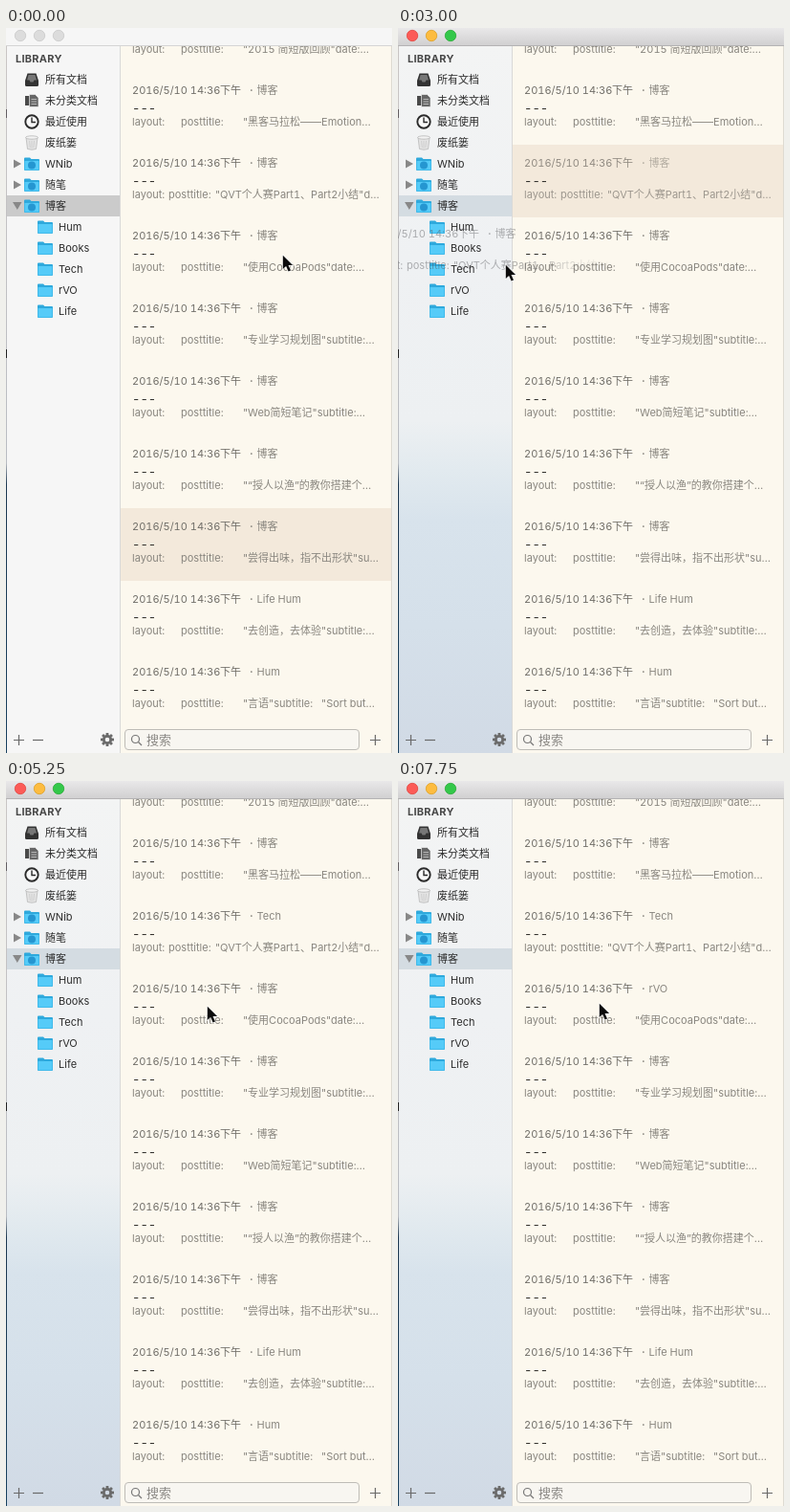
These frames come from a looping animation (404x758 px, 8000 ms). An HTML page:

```html
<!DOCTYPE html>
<html lang="zh-CN">
<head>
<meta charset="utf-8">
<title>Library</title>
<style>
  html, body { margin: 0; width: 100%; height: 100%; overflow: hidden; background: #fcf8ee; }
  svg { display: block; width: 404px; height: 758px; }
  text {
    font: 11px Inter, "Noto Sans CJK SC", "Noto Sans CJK", sans-serif;
    font-variant-numeric: tabular-nums; white-space: pre;
  }
</style>
</head>
<body>
<svg id="stage" viewBox="0 0 404 758" xmlns="http://www.w3.org/2000/svg"></svg>
<script>
const LOOP = 8000, STEP = 250, ROW = 76;
const stage = document.getElementById('stage');

const titles = [
  '"2015 简短版回顾"date:…',
  '"黑客马拉松——Emotion…',
  '"QVT个人赛Part1、Part2小结"d…',
  '"使用CocoaPods"date:…',
  '"专业学习规划图"subtitle:…',
  '"Web简短笔记"subtitle:…',
  '"“授人以渔”的教你搭建个…',
  '"尝得出味，指不出形状"su…',
  '"去创造，去体验"subtitle:…',
  '"言语"subtitle:   "Sort but…'
];
const tags = { 8: 'Life Hum', 9: 'Hum' };
const folders = ['Hum', 'Books', 'Tech', 'rVO', 'Life'];

// Cursor path: time, x, y
const path = [
  [0, 289, 237], [500, 289, 237], [750, 280, 222], [1000, 264, 190], [1250, 253, 171],
  [1500, 253, 171], [1750, 268, 172], [2000, 273, 173], [2250, 273, 173], [2500, 232, 190],
  [2750, 165, 225], [3000, 112, 247], [3250, 92, 252], [3500, 85, 253], [4500, 84, 253],
  [4750, 118, 247], [5250, 210, 235], [5750, 250, 234], [6000, 248, 233], [6250, 225, 240],
  [6750, 105, 272], [7000, 82, 275], [7250, 82, 275], [7500, 140, 255], [7750, 210, 232]
];
const drags = [
  { row: 2, folder: 2, press: 2000, start: 2500, hover: 3250, drop: 3750, x: 273, y: 173 },
  { row: 3, folder: 3, press: 5750, start: 6250, hover: 7000, drop: 7250, x: 250, y: 234 }
];

const rect = (x, y, w, h, fill, more = '') =>
  `<rect x="${x}" y="${y}" width="${w}" height="${h}" fill="${fill}" ${more}/>`;
const text = (x, y, s, fill = '#2c2c2c', more = '') =>
  `<text x="${x}" y="${y}" fill="${fill}" ${more}>${s}</text>`;
const circle = (x, y, r, fill, more = '') =>
  `<circle cx="${x}" cy="${y}" r="${r}" fill="${fill}" ${more}/>`;
const line = (d, color, w = 1) => `<path d="${d}" fill="none" stroke="${color}" stroke-width="${w}"/>`;
const shape = (d, fill) => `<path d="${d}" fill="${fill}"/>`;
const stops = list => list.map(([o, c, a = 1]) =>
  `<stop offset="${o}" stop-color="${c}" stop-opacity="${a}"/>`).join('');
const rowTop = i => 46 + ROW * (i - 1);

function note(i, ink) {
  const y = rowTop(i), tight = i === 2;
  const gray = ink || '#89867f';
  return text(132, y + 23, '2016/5/10 14:36', ink || '#716f69', 'class="date"')
    + text(224, y + 23, '下午', ink || '#716f69', 'class="date"')
    + text(255, y + 23, '·', gray, 'class="tag" style="font-weight:700"')
    + text(262.5, y + 23, tags[i] || '博客', gray, 'class="tag name"')
    + text(132, y + 43, '---', ink || '#35332f', 'style="font-size:13px"')
    + text(132, y + 56, 'layout:', gray, 'class="body"')
    + text(tight ? 170 : 183, y + 56, 'posttitle:', gray, 'class="body"')
    + text(tight ? 219 : 248, y + 56, titles[i], gray, 'class="body"');
}

const folder = (x, y) => `<g transform="translate(${x} ${y})">`
  + shape('M0-5.5Q0-6.5 1-6.5H6L7.5-5H15Q16-5 16-4V6Q16 7 15 7H1Q0 7 0 6Z', '#2fa9dc')
  + shape('M.5-3H15.5V6Q15.5 6.5 15 6.5H1Q.5 6.5.5 6Z', '#55cbf8') + '</g>';

function sidebar() {
  let s = text(10, 36, 'LIBRARY', '#484848', 'style="font-weight:700;letter-spacing:.25px"');
  const top = ['所有文档', '未分类文档', '最近使用', '废纸篓', 'WNib', '随笔', '博客'];
  top.forEach((name, i) => {
    const y = 54 + 22 * i;
    s += text(41, y + 4, name);
    if (i > 3) {
      s += folder(19, y) + circle(27, y + 1.5, 4, '#2596d1');
      s += shape(i < 6 ? `M8 ${y - 4.5}V${y + 4.5}L16 ${y}Z` : `M7 ${y - 4}H16.5L11.8 ${y + 4}Z`, '#888');
    }
  });
  // Tray, pages, clock, bin
  s += shape('M22.5 47.5H31.5L34 55V59.5Q34 61 32.5 61H21.5Q20 61 20 59.5V55Z', '#333')
    + shape('M23.5 49H30.5L32 54.5H29.5L28.5 56.5H25.5L24.5 54.5H22Z', '#777')
    + shape('M20 71H27V81H20Z', '#4a4a4a')
    + '<path d="M24.5 69.5H30.5L34 73V82.5H24.5Z" fill="#666" stroke="#eee" stroke-width=".7"/>'
    + line('M26.5 74.5H32M26.5 77H32M26.5 79.5H32', '#ccc', .8)
    + circle(27, 98, 6.7, '#f8f8f8', 'stroke="#2b2b2b" stroke-width="1.9"')
    + line('M27 93.5V98.5H31', '#2b2b2b', 1.4)
    + '<path d="M21 114.5L22.5 126.5Q27 128 31.5 126.5L33 114.5Z" fill="#e3e3e3" stroke="#b9b9b9" stroke-width=".8"/>'
    + '<ellipse cx="27" cy="114.5" rx="6.5" ry="1.7" fill="#f3f3f3" stroke="#b5b5b5" stroke-width=".8"/>'
    + line('M24.5 118L25.3 125M27 118V125.5M29.5 118L28.8 125', '#c7c7c7', .7);
  folders.forEach((name, i) => s += folder(33, 208 + 22 * i) + text(55, 212 + 22 * i, name));
  return s;
}

function gear(x, y) {
  let s = '';
  for (let a = 0; a < 360; a += 45)
    s += rect(x - 1.4, y - 7, 2.8, 4, '#6b6b6b', `transform="rotate(${a} ${x} ${y})"`);
  return s + circle(x, y, 3.7, 'none', 'stroke="#6b6b6b" stroke-width="2.8"');
}

const plus = x => line(`M${x - 5} 744.5H${x + 6}M${x + .5} 739V750`, '#696969', 1.2);

stage.innerHTML = `<defs>
  <linearGradient id="glass" x2="0" y2="1">${stops([[0, '#f3f4f4'], [.3, '#eff1f3'],
    [.53, '#edf0f2'], [.6, '#e2eaef'], [.67, '#d8e3ec'], [.82, '#d5e0ea'], [1, '#d1dae5']])}</linearGradient>
  <linearGradient id="bar" x2="0" y2="1">${stops([[0, '#e9e8e9'], [1, '#d1d0d1']])}</linearGradient>
  <linearGradient id="edge" x2="0" y2="1">${stops([[0, '#c9c5c4'], [.59, '#b9bcc2'], [.62, '#1c3750'],
    [1, '#17405f']])}</linearGradient>
  <linearGradient id="fade" gradientUnits="userSpaceOnUse" x1="290" y1="0" x2="390" y2="0">${
    stops([[0, '#55565a', .45], [1, '#55565a', 0]])}</linearGradient>
  <clipPath id="list"><path d="M120 19H404V732H120Z"/></clipPath></defs>`
  + rect(0, 0, 404, 758, '#fcf8ee')
  + rect(0, 19, 119, 739, '#f6f6f6', 'id="side"')
  + rect(0, 175, 119, 22, '#cbcbcb', 'id="pick"')
  + rect(0, 0, 119, 22, '#3f83f7', 'id="target"')
  + sidebar()
  + rect(119, 19, 1, 739, '#d9d9d8')
  + rect(120, 0, 283, ROW, '#f3e9db', 'id="sel"')
  + `<g clip-path="url(#list)">${titles.map((_, i) => `<g id="row${i}">${note(i)}</g>`).join('')}</g>`
  + plus(13) + line('M28 744.5H39', '#696969', 1.2) + gear(106, 744) + plus(386)
  + rect(124.5, 733.5, 245, 21, '#f8f6f1', 'rx="3.5" stroke="#bebcb7"')
  + circle(135.5, 743.5, 4, 'none', 'stroke="#777" stroke-width="1.2"')
  + line('M138.5 746.5L142 750', '#777', 1.3)
  + text(147, 749, '搜索', '#8b8985', 'style="font-size:13px"')
  + rect(0, 0, 404, 18, '#f6f6f6', 'id="title"')
  + rect(0, 18, 404, 1, '#d5d5d5', 'id="rule"')
  + [15, 35, 55].map(x => circle(x, 8, 5.7, '#dcdcdc', 'class="light" stroke="#cacaca" stroke-width=".8"')).join('')
  + rect(0, 19, 1, 739, 'url(#edge)') + rect(0, 85, 1, 9, '#635e62') + rect(0, 336, 1, 9, '#222')
  + rect(403, 19, 1, 739, '#dedbd2')
  + drags.map((d, i) => `<g id="ghost${i}">${note(d.row, 'url(#fade)')}</g>`).join('')
  + `<path id="cursor" d="M0 0V14.2L3.3 11.1L5.8 16.8L8.2 15.8L5.7 10.3H10.3Z" fill="#0b0b0b"
      stroke="#fff" stroke-width="1.1" paint-order="stroke"/>`;

const $ = id => document.getElementById(id);
const set = (el, attrs) => { for (const k in attrs) el.setAttribute(k, attrs[k]); };
const show = (el, on) => set(el, { visibility: on ? 'visible' : 'hidden' });
const paint = (row, cls, fill) => $('row' + row).querySelectorAll('.' + cls).forEach(el => set(el, { fill }));
const lights = [...stage.querySelectorAll('.light')];
const lamp = [['#fc5b57', '#e2463f'], ['#fdbc40', '#dfa023'], ['#34c84a', '#27aa35']];

function cursorAt(t) {
  const n = path.findIndex(p => p[0] > t);
  if (n < 0) return path[path.length - 1].slice(1);
  const a = path[n - 1], b = path[n], k = (t - a[0]) / (b[0] - a[0]);
  return [a[1] + (b[1] - a[1]) * k, a[2] + (b[2] - a[2]) * k];
}

function draw(time) {
  const t = Math.floor(time % LOOP / STEP) * STEP;
  const active = t >= 500;
  const [x, y] = cursorAt(t);
  set($('cursor'), { transform: `translate(${x + .8} ${y + .8})` });

  set($('side'), { fill: active ? 'url(#glass)' : '#f6f6f6' });
  set($('pick'), { fill: active ? '#d4dce2' : '#cbcbcb' });
  set($('title'), { fill: active ? 'url(#bar)' : '#f6f6f6' });
  set($('rule'), { fill: active ? '#b4b3b4' : '#d5d5d5' });
  lights.forEach((el, i) => {
    const [fill, stroke] = active ? lamp[i] : ['#dcdcdc', '#cacaca'];
    set(el, { fill, stroke });
  });

  const held = drags.find(d => t >= d.press && t < d.drop);
  const selected = held ? held.row : t < 2000 ? 7 : 0;
  show($('sel'), selected);
  if (selected) set($('sel'), { y: rowTop(selected) });
  paint(7, 'tag', active && selected === 7 ? '#b3aca1' : '#89867f');

  const over = held && t >= held.hover;
  show($('target'), over);
  if (over) set($('target'), { y: 197 + 22 * held.folder });

  drags.forEach((d, i) => {
    const on = d === held;
    paint(d.row, 'date', on ? '#918b82' : '#716f69');
    paint(d.row, 'tag', on ? '#b3aca1' : '#89867f');
    paint(d.row, 'body', on ? '#9d978e' : '#89867f');
    $('row' + d.row).querySelector('.name').textContent = t >= d.drop ? folders[d.folder] : '博客';
    const ghost = $('ghost' + i);
    show(ghost, on && t >= d.start);
    set(ghost, { transform: `translate(${x - d.x} ${y - d.y})` });
  });
}

const begin = performance.now();
function tick() {
  draw(performance.now() - begin);
  requestAnimationFrame(tick);
}
tick();
</script>
</body>
</html>
```
